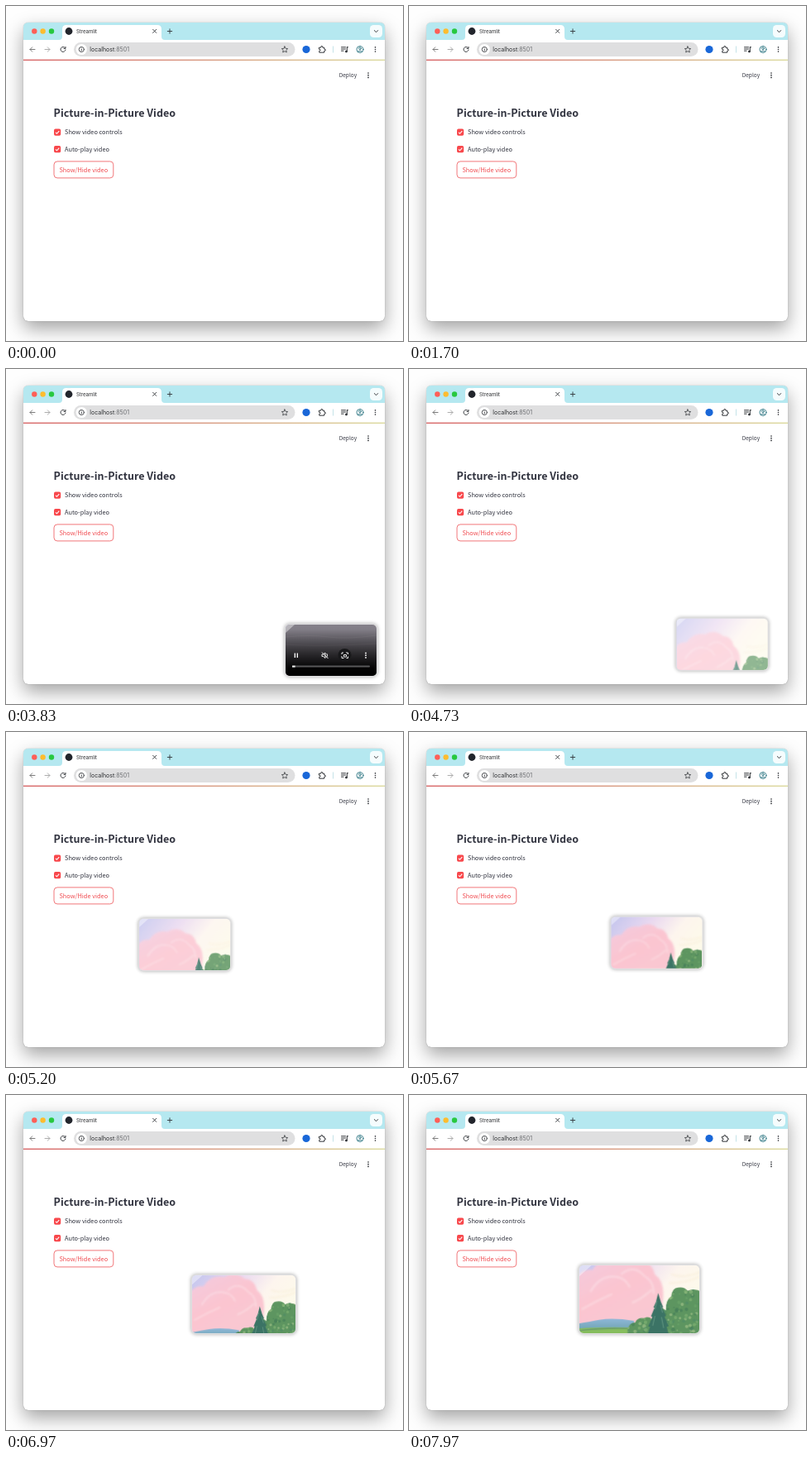
Animation of 480x405 px, one loop 8 s. Source, as an HTML page:

```html
<!DOCTYPE html>
<html lang="en">
<head>
<meta charset="utf-8">
<title>Picture-in-Picture Video</title>
<style>
html, body { margin: 0; width: 100%; height: 100%; overflow: hidden; background: #fff; }
#stage { position: relative; width: 480px; height: 405px; overflow: hidden; background: #fefefe; }
#win {
  position: absolute; left: 21px; top: 20px; width: 437px; height: 361px; border-radius: 6px;
  background: #fff; box-shadow: 0 0 1px rgba(0,0,0,.45), 0 9px 22px rgba(0,0,0,.36);
}
svg { display: block; overflow: visible; }
#page, #cursor { position: absolute; left: 0; top: 0; }
.app { font-family: "Noto Sans CJK JP", "Noto Sans CJK SC", "Noto Sans CJK", "Noto Sans", sans-serif; fill: #31333f; font-size: 7.38px; }
.ui { font-family: Inter, Roboto, sans-serif; fill: #2b2d30; }
.line { fill: none; stroke: #33363a; stroke-linecap: round; stroke-linejoin: round; }

#anchor, #video, .fill, .press, #cursor, #cursor g, #clip, .hide, .haze, #land, .bar {
  animation-duration: 8s; animation-timing-function: linear; animation-iteration-count: infinite;
}

/* button press */
.press { animation-name: press; animation-timing-function: step-end; }
.press rect { fill: var(--bg); }
.press text { fill: var(--fg); }
@keyframes press {
  0%, 10.875%, 20.875%, 30%, 100% { --bg: #fff; --fg: #f04b50; }
  10%, 20%, 29.125% { --bg: #ff4b4b; --fg: #fff; }
}

/* video box hangs from its bottom right corner */
#anchor { position: absolute; left: 0; top: 0; width: 0; height: 0; animation-name: drag; }
#video {
  position: absolute; right: 0; bottom: 0; width: 110px; aspect-ratio: 110 / 62;
  border-radius: 5px; animation-name: size;
  box-shadow: 0 0 0 1px rgba(225,225,228,.9), 0 0 4px 1.5px rgba(0,0,0,.3);
}
#clip { position: absolute; inset: 0; overflow: hidden; border-radius: 5px; }
#clip svg { width: 100%; height: 100%; }
#anchor { visibility: hidden; }
#anchor.show { visibility: visible; }
#video { animation-name: size, shown; animation-duration: 8s, 8s; animation-timing-function: linear, step-end; }
@keyframes shown {
  0%, 20.875% { visibility: hidden; }
  10.875%, 30%, 100% { visibility: visible; }
}
@keyframes drag {
  0%, 55.875% { transform: translate(448px, 371px); }
  59.125% { transform: translate(434px, 364px); }
  62.2% { transform: translate(338px, 309px); }
  65% { transform: translate(271px, 288px); }
  66.25% { transform: translate(283px, 285px); }
  67.9% { transform: translate(306px, 255px); }
  69.5% { transform: translate(342px, 264px); }
  70.875% { transform: translate(354.5px, 285.5px); }
  72.5% { transform: translate(354px, 310px); }
  74% { transform: translate(341px, 298px); }
  75.6% { transform: translate(348px, 289px); }
  76.25%, 95.6% { transform: translate(350px, 288px); }
  99.6%, 100% { transform: translate(351px, 288px); }
}
@keyframes size {
  0%, 81% { width: 110px; }
  84.5%, 95.6% { width: 125px; }
  97.125% { width: 128px; }
  99.6%, 100% { width: 145.5px; }
}

/* film */
.intro { animation-name: cut; animation-timing-function: step-end; }
@keyframes cut { 0% { opacity: 1; } 51.875%, 100% { opacity: 0; } }
.controls { animation-name: controls; }
@keyframes controls { 0%, 53.5% { opacity: 1; } 55.5%, 100% { opacity: 0; } }
.glow { animation-name: glow; animation-timing-function: step-end; }
@keyframes glow { 0%, 50%, 100% { opacity: 0; } 43.5% { opacity: 1; } }
.haze { animation-name: haze; }
@keyframes haze { 0%, 52% { opacity: .42; } 59% { opacity: .32; } 70%, 100% { opacity: 0; } }
#land { animation-name: pan; }
@keyframes pan { 0%, 51.875% { transform: translateY(29.4px); } 100% { transform: translateY(0); } }
.bar { animation-name: play; }
@keyframes play {
  0%, 10.875% { transform: scaleX(.01); }
  20.8% { transform: scaleX(.025); }
  20.9%, 30% { transform: scaleX(.01); }
  55% { transform: scaleX(.05); }
  100% { transform: scaleX(.1); }
}

/* pointer */
#cursor { width: 0; height: 0; animation-name: point; }
@keyframes point {
  0%, 2.5% { transform: translate(-20px, 186px); animation-timing-function: ease-in-out; }
  9.4%, 35% { transform: translate(98.5px, 204.5px); animation-timing-function: ease-in-out; }
  44.4%, 50% { transform: translate(409px, 347.5px); }
  53%, 55.875% { transform: translate(391px, 329px); }
  59.125% { transform: translate(375.5px, 322px); }
  62.2% { transform: translate(281px, 264px); }
  65% { transform: translate(215px, 242px); }
  66.25% { transform: translate(227px, 238px); }
  67.9% { transform: translate(250px, 207px); }
  69.5% { transform: translate(286px, 215px); }
  70.875% { transform: translate(299px, 236.5px); }
  72.5% { transform: translate(298px, 262px); }
  74% { transform: translate(285px, 250px); }
  75.6% { transform: translate(292px, 242px); }
  76.25%, 77.5% { transform: translate(294px, 241px); }
  80.2%, 81% { transform: translate(247px, 232px); }
  84.5% { transform: translate(232px, 224px); }
  87.1%, 91% { transform: translate(242px, 228px); }
  95%, 95.6% { transform: translate(232px, 224px); }
  97.125% { transform: translate(229px, 222px); }
  99.6%, 100% { transform: translate(212px, 212.5px); }
}
#cursor g { opacity: 0; animation-timing-function: step-end; }
.arrow { animation-name: arrow; }
.hand { animation-name: hand; }
.move { animation-name: move; }
.diag { animation-name: diag; }
@keyframes arrow { 0%, 35.6% { opacity: 1; } 6.4%, 41.1%, 100% { opacity: 0; } }
@keyframes hand { 0%, 35.6%, 50%, 100% { opacity: 0; } 6.4%, 43.5% { opacity: 1; } }
@keyframes move { 0%, 43.5%, 80%, 94.4%, 100% { opacity: 0; } 41.1%, 50%, 85.6% { opacity: 1; } }
@keyframes diag { 0%, 85.6% { opacity: 0; } 80%, 94.4%, 100% { opacity: 1; } }
</style>
</head>
<body>
<div id="stage">
  <div id="win"></div>
  <svg id="page" width="480" height="405" viewBox="0 0 480 405">
    <defs>
      <linearGradient id="strip"><stop stop-color="#d96a6c"/><stop offset=".5" stop-color="#d99b83"/><stop offset="1" stop-color="#dcdba0"/></linearGradient>
    </defs>
    <path d="M21 41V26q0-6 6-6H452q6 0 6 6V41z" fill="#b5e8f0"/>
    <circle cx="34.3" cy="30.5" r="3.2" fill="#ff5f57"/>
    <circle cx="44.6" cy="30.5" r="3.2" fill="#febc2e"/>
    <circle cx="55" cy="30.5" r="3.2" fill="#28c840"/>
    <path d="M64 41q4 0 4-4V28q0-5 5-5H183q5 0 5 5V37q0 4 4 4z" fill="#fff"/>
    <circle cx="76" cy="30.5" r="4.4" fill="#22252c"/>
    <text class="ui" x="85" y="32.8" font-size="6">Streamlit</text>
    <path class="line" d="M177.6 28.3l4.2 4.2m0-4.2l-4.2 4.2M195.3 30.5h5.4m-2.7-2.7v5.4" stroke-width=".9"/>
    <rect x="440" y="23" width="15" height="15" rx="4.5" fill="#f5fcfd"/>
    <path class="line" d="M445.4 29.6l2.1 2.1 2.1-2.1" stroke-width="1"/>

    <g class="line" stroke-width=".95">
      <path d="M35 52.5h-6m2.7-2.7l-2.7 2.7 2.7 2.7" stroke="#777"/>
      <path d="M47 52.5h6m-2.7-2.7l2.7 2.7-2.7 2.7" stroke="#aaa"/>
      <path d="M71.4 50.6a3 3 0 1 0 .6 2.4M72 49.4v2h-2"/>
    </g>
    <rect x="82" y="44" width="267.5" height="17" rx="8.5" fill="#dfdfe0"/>
    <circle cx="91.3" cy="52.5" r="6.6" fill="#fff"/>
    <g class="line" stroke-width=".85">
      <circle cx="91.3" cy="52.5" r="3.1"/>
      <path d="M91.3 52.4v1.6m0-3.1v.1"/>
      <path d="M337 48.9l1.1 2.4 2.6.3-1.9 1.8.5 2.6-2.3-1.3-2.3 1.3.5-2.6-1.9-1.8 2.6-.3z" stroke-width=".75"/>
      <path d="M378.8 50.2h2q-.3-1.8 1-1.8t1 1.8h2v2q1.6-.3 1.6 1t-1.6 1v2h-6v-2q1.4 0 1.4-1t-1.4-1z" stroke-width="1"/>
      <path d="M405.5 49.8h5m-5 2.2h5m-5 2.2h2.6m4.2-4.4v5.1m0-5.1h1.3" stroke-width="1"/>
      <circle cx="411.3" cy="55" r="1" fill="#33363a"/>
    </g>
    <text class="ui" x="101.3" y="55.1" font-size="7">localhost<tspan fill="#6a6c70">:8501</tspan></text>
    <circle cx="363" cy="52.5" r="4.6" fill="#1967d8"/>
    <path d="M395.5 48.5v8" stroke="#c5e3e8" stroke-width="1"/>
    <g class="line" stroke-width=".9" style="stroke:#28727f">
      <circle cx="428" cy="52.5" r="4"/><circle cx="428" cy="51.3" r="1.4"/>
      <path d="M425.2 55.2q2.8-2.2 5.6 0"/>
    </g>
    <g fill="#303338">
      <circle cx="446.5" cy="49.9" r=".8"/><circle cx="446.5" cy="52.5" r=".8"/><circle cx="446.5" cy="55.1" r=".8"/>
      <circle cx="438" cy="81" r=".85"/><circle cx="438" cy="83.7" r=".85"/><circle cx="438" cy="86.4" r=".85"/>
    </g>
    <rect x="21" y="64.6" width="437" height="1.5" fill="url(#strip)"/>

    <g class="app">
      <text x="402.8" y="86.2" font-size="6.5" style="font-size:6.5px">Deploy</text>
      <text x="57.6" y="134.4" font-weight="700" style="font-size:12.5px">Picture-in-Picture Video</text>
      <text x="71" y="155.4">Show video controls</text>
      <text x="71" y="175.9">Auto-play video</text>
      <g id="box"><rect x="58" y="148.6" width="8.2" height="8.2" rx="1.8" fill="#f8484c"/>
        <path d="M60 152.8l1.5 1.5 2.8-3.1" fill="none" stroke="#fff" stroke-width="1.1"/></g>
      <use href="#box" y="20.5"/>
      <g class="press">
        <rect x="58" y="187.9" width="71.8" height="20" rx="4" stroke="#f0686b" stroke-width=".9"/>
        <text x="64.4" y="200.8">Show/Hide video</text>
      </g>
    </g>
  </svg>

  <div id="anchor"><div id="video"><div id="clip">
    <svg viewBox="0 0 110 62" preserveAspectRatio="none">
      <defs>
        <linearGradient id="sky" x2="1" y2=".45"><stop stop-color="#c3c5ee"/><stop offset=".4" stop-color="#ead9f0"/><stop offset=".7" stop-color="#fdf5ee"/><stop offset="1" stop-color="#fdfaea"/></linearGradient>
        <linearGradient id="cloud" x2=".5" y2="1"><stop stop-color="#f3cbe0"/><stop offset=".45" stop-color="#fbc5d0"/><stop offset="1" stop-color="#f8c9d3"/></linearGradient>
        <linearGradient id="hill" x2="0" y2="1"><stop stop-color="#8db7d8"/><stop offset="1" stop-color="#6fa3ae"/></linearGradient>
        <linearGradient id="ground" x2="0" y2="1"><stop stop-color="#85818a"/><stop offset="1" stop-color="#66626a"/></linearGradient>
        <linearGradient id="shade" x2="0" y2="1"><stop offset=".1" stop-opacity="0"/><stop offset=".55" stop-opacity=".6"/><stop offset=".85" stop-opacity=".96"/><stop offset="1"/></linearGradient>
        <filter id="soft"><feGaussianBlur stdDeviation=".8"/></filter>
        <clipPath id="wood"><path id="trees" d="M44 70V58q2-6 7-6 2-5 8-4 5-2 7 1l4-12 4 0 5 4q0-10 5-13 1-8 6-8 6-1 9 3 6-3 13 1V70z"/></clipPath>
      </defs>
      <rect width="110" height="62" fill="url(#sky)"/>
      <g id="land">
        <path filter="url(#soft)" fill="url(#cloud)" d="M-4 80V12Q4 2 12 4 20-9 34-6 46-13 56-4 66-4 69 8 79 15 76 34V80z"/>
        <g filter="url(#soft)" fill="none" stroke="#fff" stroke-width="1.6" opacity=".32">
          <path d="M10 24q8-14 20-14t16 10M38 8q12-10 22 2 8 4 8 16M2 40q14-8 28-14M48 34q10-4 18-12"/>
          <path d="M84 8q12 4 26-2M82 16q16 0 28-6" stroke="#f5e6c6"/>
        </g>
        <path fill="url(#hill)" d="M-1 53Q10 51 18 49.500 32 47.500 50 50.500V60H-1z"/>
        <path fill="#86bd5e" d="M-1 57.500Q24 55.500 60 57V64H-1z"/>
        <path fill="#6e9d6b" d="M-1 59Q20 56 44 57V58Q20 57.500-1 60z"/>
        <use href="#trees" fill="#5d9560"/>
        <g id="dabs" clip-path="url(#wood)"></g>
        <path fill="#3b7365" d="M72 25l2.400 8 2.200 5-1 .2 3.600 8-1.500.3 4 9-2 .3L82 64H62l2.600-8-1.800-.3 4-9-1.400-.3 3.300-8-1-.2 2.300-5z"/>
        <path d="M71 32l-2 8m5-4l2 7m-7 3l-2 9m8-8l2 10" stroke="#609581" stroke-width=".8"/>
      </g>
      <rect class="haze" width="110" height="62" fill="#fff"/>
      <g class="intro hide">
        <rect width="110" height="62" fill="url(#ground)"/>
        <path d="M0 15q30-3 52 0t58-2M0 24q40 3 110-1" stroke="#948f97" stroke-width=".8" fill="none" opacity=".5"/>
      </g>
      <g class="controls hide">
        <rect width="110" height="62" fill="url(#shade)"/>
        <circle class="glow hide" cx="71.500" cy="37" r="8" fill="#18181a" opacity="0"/>
        <path d="M11.300 34.600v5.400m3-5.400v5.400" stroke="#fff" stroke-width="1.300"/>
        <g fill="none" stroke="#fff" stroke-width=".9">
          <path d="M44 36v2.500h1.700l2.300 2v-6.500l-2.300 2zM49.700 35q2 2 0 4.500M44 33.500l7.500 7.500"/>
          <path d="M70 34h-2v2m5-2h2.500v2m-7.500 2v2.500h2.500m3 0h2v-2M70.500 36.500h3v2.500h-3z"/>
        </g>
        <g fill="#fff"><circle cx="97" cy="34.500" r=".9"/><circle cx="97" cy="37.200" r=".9"/><circle cx="97" cy="39.900" r=".9"/></g>
        <rect x="8" y="49.600" width="94" height="1.800" rx=".9" fill="#58585a"/>
        <g transform="translate(8 49.600)"><rect class="bar" width="94" height="1.800" fill="#fff"/></g>
      </g>
      <path d="M0 0H11L0 10z" fill="#fff" opacity=".42"/>
    </svg>
  </div></div></div>

  <svg id="cursor" viewBox="0 0 1 1" width="1" height="1">
    <g class="arrow"><path d="M-3-5v9.500l2.200-2 1.400 3.300 1.600-.7-1.400-3.200h3z" fill="#111" stroke="#fff" stroke-width=".8"/></g>
    <g class="hand"><path d="M-1.800-4.200q1-1 1.700.2l.5 2.300q1-.7 1.500.2 1-.5 1.400.4 1.300-.2 1.300 1.200 0 2.800-1.200 4.500h-4.600Q-2.600 2.600-4 .6q.2-1.400 1.500-.5l.8.800z" fill="#fff" stroke="#222" stroke-width=".85" stroke-linejoin="round"/></g>
    <g class="move"><path id="cross" d="M0-4l1.800 2H.6v1.400H2v-1.200L4 0 2 1.800V.6H.6V2h1.200L0 4-1.800 2h1.200V.6H-2v1.200L-4 0l2-1.800v1.200h1.400V-2h-1.200z" fill="#111" stroke="#fff" stroke-width="1.200" paint-order="stroke"/></g>
    <g class="diag"><path d="M-3.700-3.700h3.300L-1.500-2.500l4 4L3.700.4v3.300H.4L1.500 2.500l-4-4L-3.700-.4z" fill="#111" stroke="#fff" stroke-width="1" paint-order="stroke"/></g>
  </svg>
</div>
<script>
// Leaf dabs from a seeded generator
let seed = 7;
const rnd = () => (seed = seed * 16807 % 2147483647) / 2147483647;
const tones = ['#83b476', '#457f59', '#a3c48b', '#508d68', '#6ca56b'];
let leaves = '';
for (let i = 0; i < 170; i++) {
  const x = 44 + rnd() * 66, y = 19 + rnd() * 45, r = .6 + rnd() * 1.2;
  leaves += `<circle cx="${x}" cy="${y}" r="${r}" fill="${tones[i % tones.length]}" opacity=".65"/>`;
}
document.getElementById('dabs').innerHTML = leaves;
</script>
</body>
</html>
```
